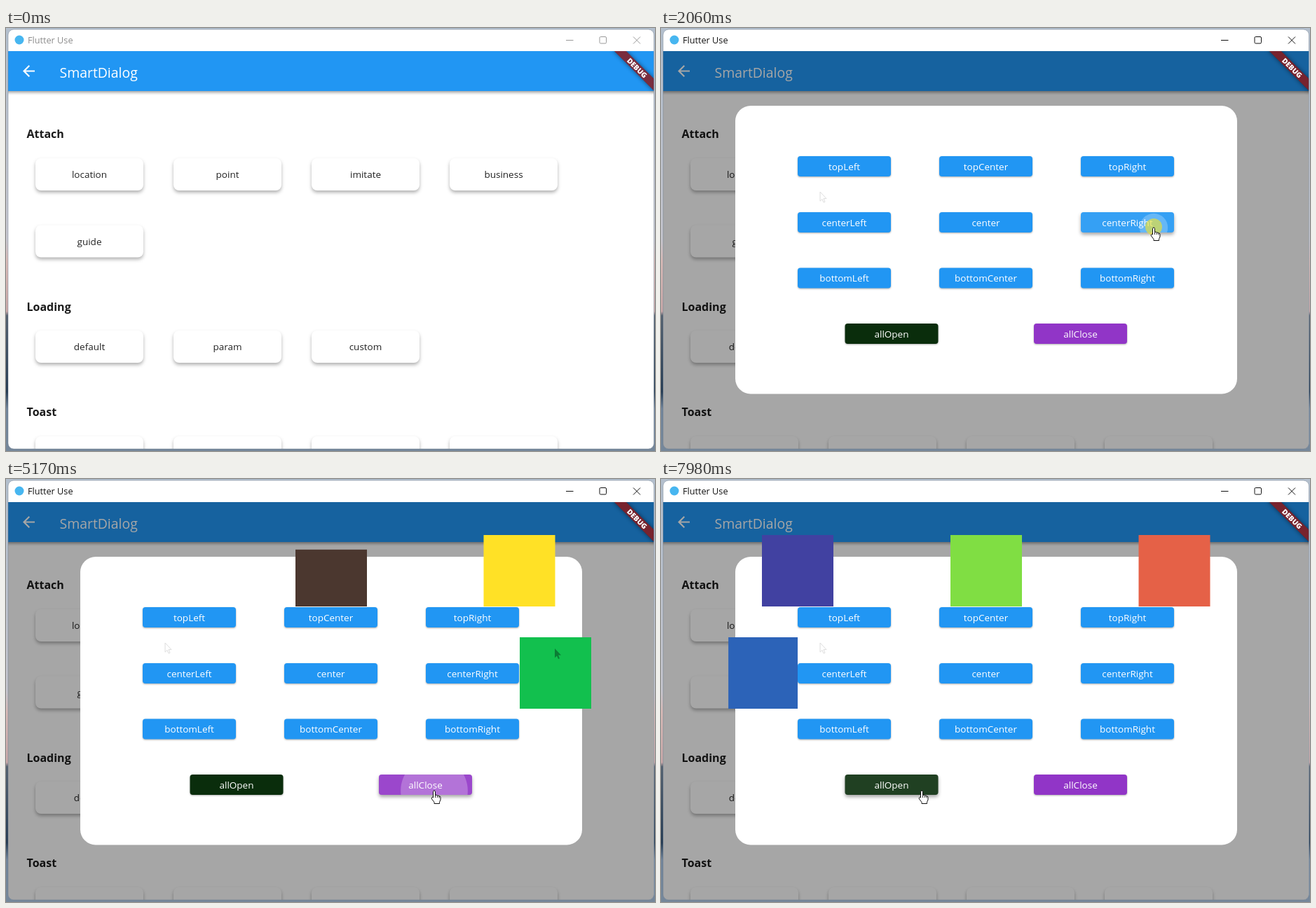
Write an HTML page that moves like this. It is 926 by 604 pixels and loops after 8 s.

```html
<!DOCTYPE html>
<html lang="en">
<head>
<meta charset="utf-8">
<title>SmartDialog</title>
<style>
  html, body { margin: 0; width: 100%; height: 100%; overflow: hidden; }
  #stage { display: block; width: 100vw; height: 100vh; font: 13.5px "Open Sans", "Noto Sans", sans-serif; }
  .heading { font-size: 16px; font-weight: 700; fill: #1c1c1c; }
  .card > .face { fill: #fff; filter: drop-shadow(0 3px 2.5px rgba(0,0,0,.3)); }
  .card text { fill: #222; }
  .card .hover { fill: #000; fill-opacity: .02; }
  .action > .face { filter: drop-shadow(0 1.5px 1.2px rgba(0,0,0,.32)); }
  .action text { fill: #fff; }
  .action .hover { fill: #fff; fill-opacity: .09; }
  .hover { opacity: 0; }
  .ripple { fill: #fff; fill-opacity: .24; }
  .card .ripple { fill: #000; fill-opacity: .07; }
  .arrow, .hand { fill: #fff; stroke: #111; stroke-width: 1; stroke-linejoin: round; }
</style>
</head>
<body>
<svg id="stage" viewBox="0 0 926 604" preserveAspectRatio="none"></svg>
<script>
const LOOP = 8000, OPEN_TIME = 260, SIDE = 102;
const stage = document.getElementById('stage');
const buttons = {};

function button(kind, label, x, y, w, h, rx, fill = '') {
  const id = `${kind}-${label}-${x}-${y}`;
  buttons[id] = { kind, label, x, y, w, h };
  const box = `x="${x}" y="${y}" width="${w}" height="${h}"`;
  return `<g id="${id}" class="${kind}">
    <rect class="face" ${box} rx="${rx}" fill="${fill}"/>
    <rect class="hover" ${box} rx="${rx}"/>
    <svg ${box} overflow="hidden"><circle class="ripple" r="0"/></svg>
    <text x="${x + w / 2}" y="${y + h / 2 + 5.2}" text-anchor="middle">${label}</text></g>`;
}

const cardRow = (y, labels) =>
  labels.map((label, i) => button('card', label, 42 + 197 * i, y, 154, 46, 8)).join('');
const actionRow = (y, labels) =>
  labels.map((label, i) => button('action', label, 195 + 202 * i, y, 133, 29, 4, '#2196f3')).join('');
const heading = (y, label) => `<text class="heading" x="29.5" y="${y}">${label}</text>`;

const ARROW = 'M0 0V13.2L3 10.4 5 15 7 14.2 5 9.6H9Z';
const HAND = 'M-1.5 10V1.5A1.5 1.5 0 0 1 1.5 1.5V6.5Q4 5.5 4.3 7.2Q6.6 6.5 7 8Q9 7.7 9 9.5V13' +
  'L7.5 16.5V18.5H0V16.5L-3.6 11.8Q-4.2 9.5-2.6 9.3Z';

// Attached squares: the side they grow towards, and when they open and close.
const squares = [
  { x: 733, y: 226, side: 'right', fill: '#12c04e', open: 2134, close: 5816 },
  { x: 681.5, y: 80, side: 'top', fill: '#ffe126', open: 3010, close: 5467 },
  { x: 413, y: 80, side: 'top', fill: '#4b372f', open: 3960, close: 5118 },
  { x: 144, y: 80, side: 'top', fill: '#4141a1', open: 6730 },
  { x: 413, y: 80, side: 'top', fill: '#80de43', open: 7063 },
  { x: 681.5, y: 80, side: 'top', fill: '#e56147', open: 7396 },
  { x: 93, y: 226, side: 'left', fill: '#2c63b8', open: 7729 },
];

const presses = [
  ['location', 1020], ['centerRight', 2024], ['topRight', 2900],
  ['topCenter', 3850], ['allClose', 5008], ['allOpen', 6620],
].map(([label, time]) => ({ label, time }));

// Pointer stops: time, x, y
const route = [
  [130, 852, 594], [690, 138, 214], [780, 149, 216], [1400, 149, 216], [1500, 227, 234],
  [1760, 692, 281], [1880, 703, 285], [2330, 703, 285], [2580, 650, 208], [2790, 611, 189],
  [3430, 611, 189], [3600, 540, 208], [3780, 450, 198], [4270, 450, 198], [4540, 783, 242],
  [4900, 611, 445], [5930, 611, 445], [6200, 480, 456], [6490, 372, 445], [8000, 372, 445],
];

stage.innerHTML = `
  <defs>
    <linearGradient id="desktop" x1="0" y1="0" x2="0" y2="1">
      <stop offset="0" stop-color="#b3bfcd"/><stop offset=".5" stop-color="#c6c6ce"/>
      <stop offset=".55" stop-color="#d8bab6"/><stop offset=".67" stop-color="#c9a8a8"/>
      <stop offset=".68" stop-color="#53606f"/><stop offset=".86" stop-color="#243a52"/>
      <stop offset=".9" stop-color="#71849a"/><stop offset="1" stop-color="#75879a"/>
    </linearGradient>
    <clipPath id="frame"><rect x="3" y="2" width="921.5" height="599" rx="8"/></clipPath>
    <clipPath id="client"><rect x="3" y="33" width="921.5" height="568"/></clipPath>
  </defs>
  <rect width="926" height="604" fill="url(#desktop)"/>
  <g clip-path="url(#frame)">
    <rect width="926" height="604" fill="#fff"/>
    <g clip-path="url(#client)">
      <rect x="-5" y="20" width="940" height="70" fill="#2196f3"
        style="filter:drop-shadow(0 2px 2px rgba(0,0,0,.4))"/>
      <path transform="translate(19.8 48.8) scale(1.06)" fill="#fff"
        d="M20 11H7.83l5.59-5.59L12 4l-8 8 8 8 1.41-1.41L7.83 13H20v-2z"/>
      <text x="76.5" y="70.5" font-size="19.4" fill="#fff">SmartDialog</text>
      ${heading(157, 'Attach')}
      ${cardRow(186, ['location', 'point', 'imitate', 'business'])}
      ${cardRow(281.5, ['guide'])}
      ${heading(403.5, 'Loading')}
      ${cardRow(432, ['default', 'param', 'custom'])}
      ${heading(554, 'Toast')}
      ${cardRow(583, ['default', 'bounce', 'more', 'none'])}
      <rect id="barrier" y="33" width="926" height="571"/>
      <g id="dialog">
        <rect x="106" y="111" width="716" height="411.5" rx="22" fill="#fff"/>
        <path id="trace" class="arrow" d="${ARROW}" transform="translate(227 234)" opacity=".14"/>
        ${actionRow(183, ['topLeft', 'topCenter', 'topRight'])}
        ${actionRow(263, ['centerLeft', 'center', 'centerRight'])}
        ${actionRow(342.5, ['bottomLeft', 'bottomCenter', 'bottomRight'])}
        ${button('action', 'allOpen', 262.5, 422, 133, 29, 4, '#0a2d0c')}
        ${button('action', 'allClose', 532, 422, 133, 29, 4, '#9135c7')}
      </g>
      ${squares.map((s, i) => `<rect id="square${i}" fill="${s.fill}"/>`).join('')}
      <path id="greenTrace" d="${ARROW}" transform="translate(783 242)" fill="#0b7d35"/>
      <g transform="translate(924.5 33) rotate(45)">
        <rect x="-42" y="28" width="84" height="12" fill="#000" opacity=".5"
          style="filter:drop-shadow(0 0 3px #000)"/>
        <rect x="-42" y="28" width="84" height="12" fill="#b71c1c" fill-opacity=".627"/>
        <text y="37.8" font-size="10.2" font-weight="800" fill="#fff" text-anchor="middle">DEBUG</text>
      </g>
    </g>
    <circle cx="19" cy="17" r="6.5" fill="#47b6f0"/>
    <g id="titleBar">
      <text x="31" y="22" font-size="12.7">Flutter Use</text>
      <path d="M799 17.5H809.5M895 12.5l10 10M905 12.5l-10 10" fill="none" stroke="currentColor"/>
      <rect x="847" y="12.5" width="9.5" height="9.5" rx="1.5" fill="none" stroke="currentColor"/>
    </g>
  </g>
  <rect x="3" y="2" width="921.5" height="599" rx="8" fill="none" stroke="#67798c" stroke-opacity=".45"/>
  <g id="pointer">
    <circle id="marker" cy="-1" r="12" fill="#ebe132" fill-opacity=".65"/>
    <path id="arrow" class="arrow" d="${ARROW}"/>
    <path id="hand" class="hand" d="${HAND}"/>
    <path id="fingers" d="M1.5 6.5V10M4.3 7.2V10M7 8V10.5" stroke="#111" stroke-width=".9"/>
  </g>`;

const get = id => document.getElementById(id);
const set = (el, attrs) => { for (const k in attrs) el.setAttribute(k, attrs[k]); };
const show = (el, visible) => set(el, { visibility: visible ? 'visible' : 'hidden' });
const ramp = (t, start, length) => Math.min(1, Math.max(0, (t - start) / length));

for (const id in buttons) {
  const el = get(id);
  Object.assign(buttons[id], {
    hover: el.querySelector('.hover'), ripple: el.querySelector('.ripple'), face: el.querySelector('.face'),
  });
}

function pointerAt(t) {
  let i = 0;
  while (i < route.length - 2 && t >= route[i + 1][0]) i++;
  const [t0, x0, y0] = route[i], [t1, x1, y1] = route[i + 1];
  const p = ramp(t, t0, t1 - t0), e = p * p * (3 - 2 * p);
  return [x0 + (x1 - x0) * e, y0 + (y1 - y0) * e];
}

function drawButtons(t, px, py) {
  const layer = t < 1150 ? 'card' : 'action';
  const press = presses.filter(p => p.time <= t).pop();
  let overButton = false;
  for (const b of Object.values(buttons)) {
    const over = t >= 130 && b.kind === layer && py < 601 &&
      px >= b.x && px <= b.x + b.w && py >= b.y && py <= b.y + b.h;
    overButton ||= over;
    b.hover.style.opacity = over ? 1 : 0;
    b.face.style.filter = over && b.kind === 'action' ? 'drop-shadow(0 3px 2.5px rgba(0,0,0,.35))' : '';
    const age = press && press.label === b.label ? t - press.time : Infinity;
    if (age < 500) {
      const [x, y] = pointerAt(press.time);
      set(b.ripple, { cx: x - b.x, cy: y - b.y, r: 12 + .22 * age, opacity: 1 - ramp(age, 250, 200) });
    } else set(b.ripple, { r: 0 });
  }
  show(get('marker'), press && t - press.time < 100);
  return overButton;
}

function drawSquare(s, i, t) {
  const grow = ramp(t, s.open, OPEN_TIME) * (1 - ramp(t, s.close ?? Infinity, OPEN_TIME));
  const size = SIDE * grow, rest = SIDE - size, top = s.side === 'top';
  set(get('square' + i), {
    x: s.x + (s.side === 'left' ? rest : 0), y: s.y + (top ? rest : 0),
    width: top ? SIDE : size, height: top ? size : SIDE,
  });
}

function draw(t) {
  const opening = ramp(t, 1140, OPEN_TIME);
  const scale = 1 - (1 - opening) ** 1.42;
  set(get('barrier'), { opacity: .35 * opening });
  set(get('dialog'), { transform: `translate(464 316.5) scale(${scale}) translate(-464 -316.5)` });
  show(get('dialog'), opening > 0);
  show(get('trace'), t >= 1500);
  show(get('greenTrace'), t >= 4560 && t < 5930);

  const active = t >= 1020;
  set(get('titleBar'), { color: active ? '#111' : '#999', fill: active ? '#111' : '#8c8c8c' });
  squares.forEach((s, i) => drawSquare(s, i, t));

  const [x, y] = pointerAt(t);
  const hand = drawButtons(t, x, y);
  const present = t >= 130;
  set(get('pointer'), { transform: `translate(${x} ${y})` });
  show(get('arrow'), present && !hand);
  show(get('hand'), present && hand);
  show(get('fingers'), present && hand);
}

const began = performance.now();
function tick() {
  draw((performance.now() - began) % LOOP);
  requestAnimationFrame(tick);
}
tick();
</script>
</body>
</html>
```
